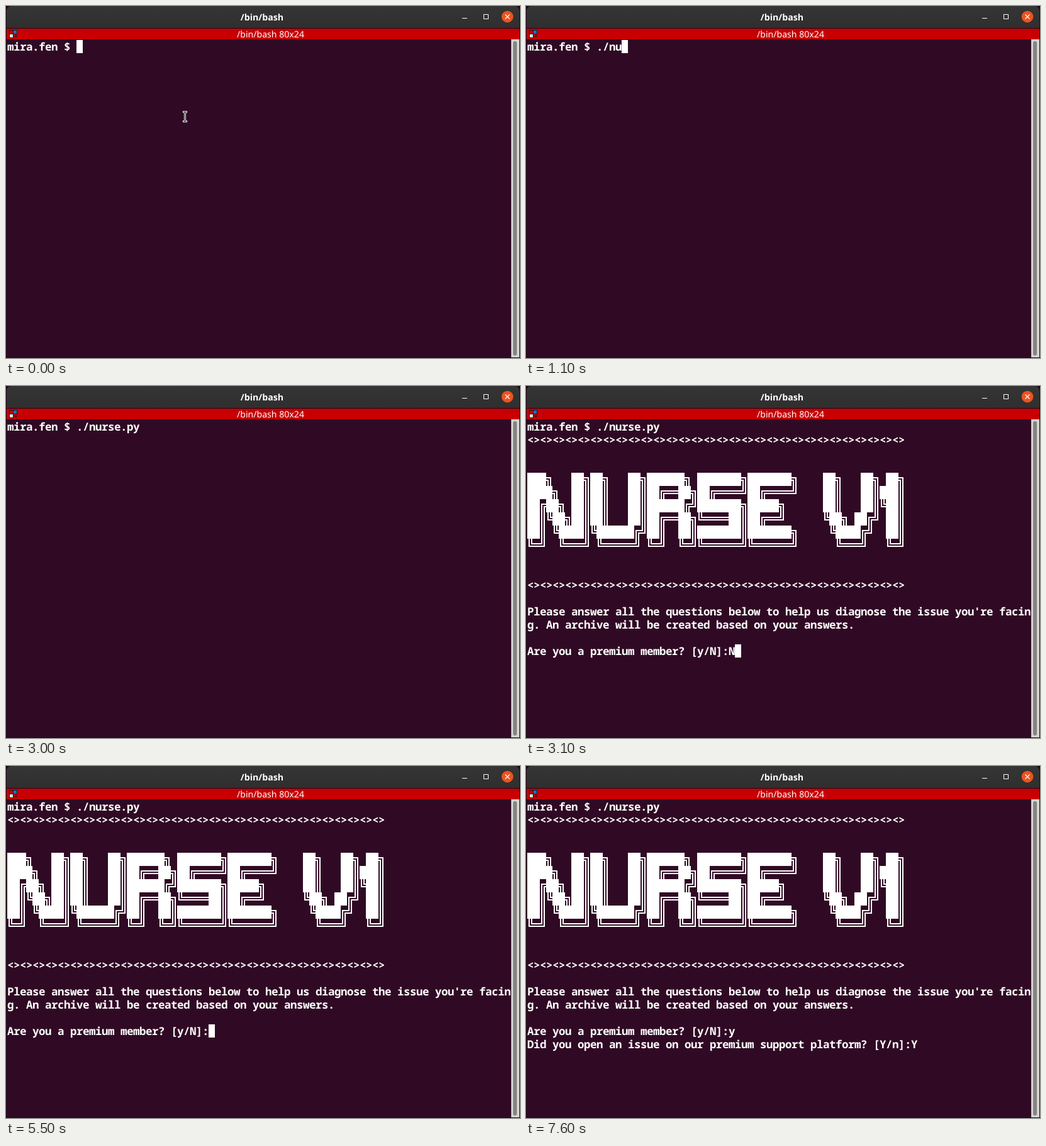
An HTML page for the animation above (8000 ms loop, 817x560 px).

```html
<!DOCTYPE html>
<html lang="en">
<head>
<meta charset="utf-8">
<title>Terminal</title>
<style>
  html, body { margin: 0; width: 100%; height: 100%; overflow: hidden; background: #1c0615; }
  svg { display: block; }
  text { fill: #fff; white-space: pre; text-rendering: geometricPrecision; }
  .bar { font-family: "Noto Sans", "Open Sans", sans-serif; text-anchor: middle; }
  #lines text { font: bold 17.5px "Noto Sans Mono", "Liberation Mono", monospace; letter-spacing: -.5px; }
  .crisp { shape-rendering: crispEdges; }
</style>
</head>
<body>
<svg width="817" height="560" viewBox="0 0 817 560">
  <defs>
    <linearGradient id="head" x2="0" y2="1">
      <stop stop-color="#363535"/><stop offset="1" stop-color="#302f2f"/>
    </linearGradient>
  </defs>

  <!-- window frame -->
  <path d="M1 35V8Q1 0 9 0H808Q816 0 816 8V35Z" fill="url(#head)"/>
  <g class="crisp">
    <rect x="1" y="36" width="815" height="17" fill="#c80003"/>
    <rect x="1" y="53" width="802" height="506" fill="#300a24"/>
    <rect x="803" y="53" width="13" height="506" fill="#d6d4d2"/>
  </g>
  <rect x="806" y="56" width="6" height="500" rx="3" fill="#858483"/>
  <text class="bar" x="407" y="23" font-size="14.2" font-weight="700">/bin/bash</text>
  <text class="bar" x="420.5" y="50" font-size="14.1">/bin/bash 80x24</text>

  <!-- window buttons -->
  <g fill="none" stroke="#fff">
    <path class="crisp" d="M725 19.5H733M759.5 13.5H766.5V20.5H759.5Z"/>
    <circle cx="797" cy="17" r="9.3" fill="#e95420" stroke="none"/>
    <path d="M793.5 13.5L800.5 20.5M800.5 13.5L793.5 20.5" stroke-width="1.3"/>
  </g>

  <!-- pane menu -->
  <g class="crisp" stroke="#1b1b1b">
    <rect x="5.5" y="38.5" width="6" height="6" fill="#c80003"/>
    <rect x="11.5" y="38.5" width="6" height="6" fill="#1f6fc4"/>
    <rect x="5.5" y="44.5" width="6" height="6" fill="#ddd"/>
    <path d="M13 47H18L15.5 50Z" fill="#1b1b1b" stroke="none"/>
  </g>

  <g id="lines"></g>
  <g id="banner" class="crisp">
    <path id="blocks" fill="#fff"/>
    <path id="edges" fill="none" stroke="#fff" stroke-width="2"/>
  </g>
  <rect id="cursor" class="crisp" width="10" height="21" fill="#fff"/>
  <g id="pointer" class="crisp" fill="none">
    <path d="M281 168.5H288M281 183.5H288M284.5 167V185" stroke="#fff" stroke-width="3"/>
    <path d="M282 168.5H287M282 183.5H287M284.5 168V184" stroke="#000"/>
  </g>
</svg>
<script>
const LOOP = 8000, CELL_W = 10, CELL_H = 21, LEFT = 2, TOP = 54;
const $ = id => document.getElementById(id);

const BANNER = [
  "███╗   ██╗██╗   ██╗██████╗ ███████╗███████╗    ██╗   ██╗ ██╗",
  "████╗  ██║██║   ██║██╔══██╗██╔════╝██╔════╝    ██║   ██║███║",
  "██╔██╗ ██║██║   ██║██████╔╝███████╗█████╗      ██║   ██║╚██║",
  "██║╚██╗██║██║   ██║██╔══██╗╚════██║██╔══╝      ╚██╗ ██╔╝ ██║",
  "██║ ╚████║╚██████╔╝██║  ██║███████║███████╗     ╚████╔╝  ██║",
  "╚═╝  ╚═══╝ ╚═════╝ ╚═╝  ╚═╝╚══════╝╚══════╝      ╚═══╝   ╚═╝"
];
// Strokes of each double-line piece, relative to its cell's corner
const EDGES = {
  "═": "m0 8h10m-10 4h10",
  "║": "m3 0v21m4 -21v21",
  "╔": "m3 21v-13h7m-3 13v-9h3",
  "╗": "m0 8h7v13m-7 -9h3v9",
  "╚": "m3 0v12h7m-3 -12v8h3",
  "╝": "m0 12h7v-12m-7 8h3v-8"
};

let blocks = "", edges = "";
BANNER.forEach((line, row) => [...line].forEach((ch, col) => {
  const start = `M${LEFT + col * CELL_W} ${TOP + (row + 4) * CELL_H}`;
  if (ch === "█") blocks += start + "h10v21h-10z";
  else if (EDGES[ch]) edges += start + EDGES[ch];
}));
$("blocks").setAttribute("d", blocks);
$("edges").setAttribute("d", edges);

function addLine(row) {
  const el = document.createElementNS("http://www.w3.org/2000/svg", "text");
  el.setAttribute("x", LEFT);
  el.setAttribute("y", TOP + row * CELL_H + 17);
  return $("lines").appendChild(el);
}

const PROMPT = "mira.fen $ ", COMMAND = "./nurse.py";
const KEYS = [100, 300, 800, 1100, 1200, 1400, 1700, 1900, 2200, 2400];
const RULE = "<>".repeat(30);
const answer = t => t < 5500 ? "N" : t < 6000 ? "" : "y";
const typed = t => KEYS.filter(k => t >= k).length;

// row, time of appearance, text
const LINES = [
  [0, 0, t => PROMPT + COMMAND.slice(0, typed(t))],
  [1, 3100, () => RULE],
  [12, 3100, () => RULE],
  [14, 3100, () => "Please answer all the questions below to help us diagnose the issue you're facin"],
  [15, 3100, () => "g. An archive will be created based on your answers."],
  [17, 3100, t => "Are you a premium member? [y/N]:" + answer(t)],
  [18, 7000, () => "Did you open an issue on our premium support platform? [Y/n]:Y"]
].map(([row, from, text]) => ({ el: addLine(row), from, text }));

// from, to, column, row
const CURSOR = [
  [3100, 3600, 33, 17], [4200, 4900, 33, 17], [5400, 5500, 33, 17],
  [5500, 6000, 32, 17], [6000, 6600, 33, 17], [7000, 7600, 62, 18]
];

const show = (el, on) => el.setAttribute("visibility", on ? "visible" : "hidden");

function draw(t) {
  for (const { el, from, text } of LINES) {
    const s = t >= from ? text(t) : "";
    if (el.textContent !== s) el.textContent = s;
  }
  const spot = t < 3000
    ? [0, 0, PROMPT.length + typed(t), 0]
    : CURSOR.find(([from, to]) => t >= from && t < to);
  show($("cursor"), spot);
  if (spot) {
    $("cursor").setAttribute("x", LEFT + spot[2] * CELL_W);
    $("cursor").setAttribute("y", TOP + spot[3] * CELL_H);
  }
  show($("banner"), t >= 3100);
  show($("pointer"), t < 100);
}

const begin = performance.now();
function tick() {
  draw((performance.now() - begin) % LOOP);
  requestAnimationFrame(tick);
}
tick();
</script>
</body>
</html>
```
